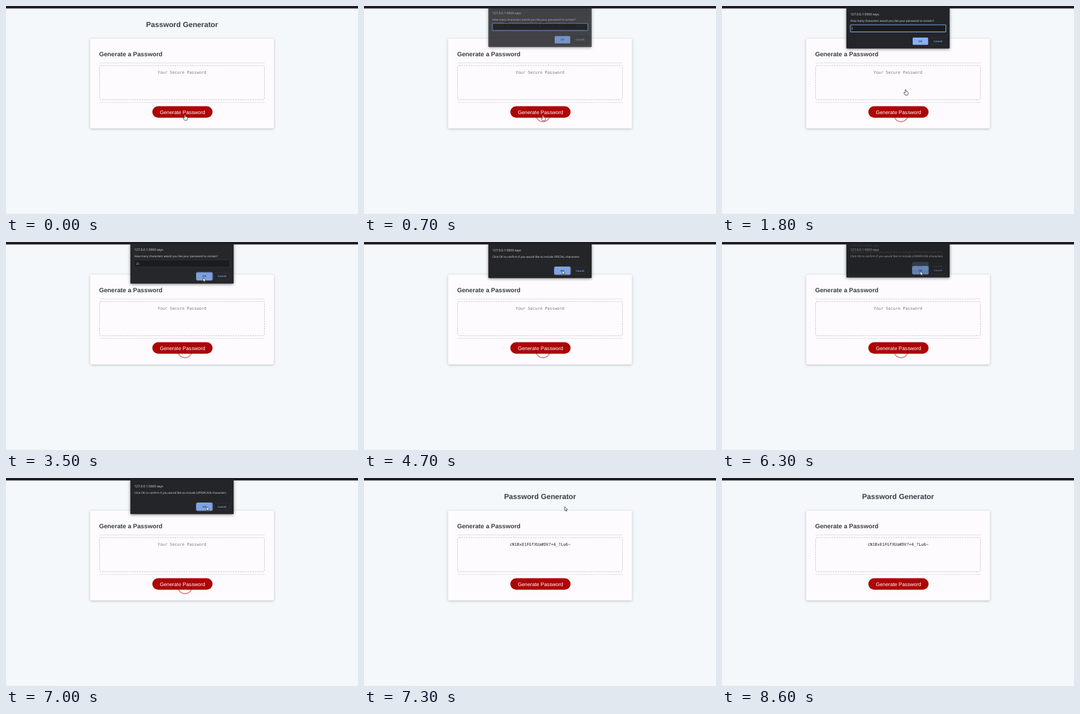
Write an HTML page with a canvas that moves like this. It is 600 px wide and 356 px high and loops after 9200 ms.

```html
<!DOCTYPE html>
<html lang="en">
<head>
<meta charset="utf-8">
<title>Password Generator</title>
<style>
  html, body { margin: 0; width: 100%; height: 100%; overflow: hidden; background: #f4f8fa; }
  canvas { display: block; width: 600px; height: 356px; }
</style>
</head>
<body>
<canvas id="stage" width="600" height="356"></canvas>
<script>
const ctx = document.getElementById('stage').getContext('2d');
const LOOP = 9200, STEP = 100, FADE = 200;
const ARIAL = '"Liberation Sans", Arial, sans-serif';
const UI = '"Open Sans", "Noto Sans", sans-serif';
const MONO = '"DejaVu Sans Mono", monospace';

const include = kind => `Click OK to confirm if you would like to include ${kind} characters`;
const dialogs = [
  { open: 600, close: 3470, prompt: true, text: 'How many characters would you like your password to contain?' },
  { open: 3560, close: 4780, text: include('SPECIAL') },
  { open: 4800, close: 5440, text: include('NUMERIC') },
  { open: 5440, close: 6280, text: include('LOWERCASE') },
  { open: 6280, close: 7080, text: include('UPPERCASE') }
];

// Pointer tip: time, x, y
const pointerPath = [
  [0, 305, 186], [1100, 305, 187], [1700, 313, 143], [2500, 313, 143],
  [3000, 336, 61], [3600, 336, 61], [4000, 338, 48.5], [5000, 338, 48.5],
  [5400, 337, 51], [6300, 338, 50], [6700, 342, 49], [7400, 342, 49],
  [7800, 270, 176], [7900, 270, 176], [8600, -12, 346]
];

const hand = new Path2D('M-.9 .8Q0-.6.9 .8V3.4L3.6 4.1Q4.6 4.5 4.4 6L3.7 9.5H-.8L-3.2 6Q-3 4.7-1.8 5.4L-.9 6Z');
const arrow = new Path2D('M0 0V7L1.6 5.5 2.7 8 3.8 7.5 2.8 5.1H5Z');
const beam = new Path2D('M-1.5-4H1.5M0-4V4M-1.5 4H1.5');

const clamp = v => Math.max(0, Math.min(1, v));
const smooth = v => v * v * (3 - 2 * v);

function box(x, y, w, h, r, fill, stroke, width = 1) {
  ctx.beginPath();
  ctx.roundRect(x, y, w, h, r);
  if (fill) { ctx.fillStyle = fill; ctx.fill(); }
  if (stroke) { ctx.strokeStyle = stroke; ctx.lineWidth = width; ctx.stroke(); }
}

function write(text, x, y, font, color, align = 'left') {
  ctx.font = font;
  ctx.fillStyle = color;
  ctx.textAlign = align;
  ctx.fillText(text, x, y);
}

function shadow(color, blur, y) {
  ctx.shadowColor = color;
  ctx.shadowBlur = blur;
  ctx.shadowOffsetY = y;
}

function drawPage(t) {
  ctx.fillStyle = '#f4f8fa';
  ctx.fillRect(0, 0, 600, 356);
  ctx.fillStyle = '#211c24';
  ctx.fillRect(0, 0, 600, 4);
  ctx.fillStyle = 'rgba(33,28,36,.35)';
  ctx.fillRect(0, 4, 600, .7);
  ctx.fillStyle = '#eeefed';
  ctx.fillRect(0, 355, 80, 1);

  write('Password Generator', 300, 36, `bold 12.55px ${ARIAL}`, '#3a3f48', 'center');

  ctx.save();
  shadow('rgba(0,0,0,.24)', 4, 1);
  box(143.3, 56, 313.5, 153.5, 2, '#fdfbfd');
  ctx.restore();
  write('Generate a Password', 158.7, 85.5, `bold 10.63px ${ARIAL}`, '#3a3f48');
  ctx.fillStyle = '#dfdfe3';
  ctx.fillRect(159, 97, 282, 1);
  ctx.fillRect(159, 164.5, 282, 1);

  ctx.setLineDash([2.6, 1.6]);
  box(159.5, 102, 281, 58.3, 2, null, '#bfbfc2', .9);
  ctx.setLineDash([]);
  const done = t >= 7200;
  write(done ? 'cN1BxE1FGfXUa#DV?+4_?Lu6~' : 'Your Secure Password', 300, 115.7,
    `6.9px ${MONO}`, done ? '#202024' : '#7b7b7f', 'center');

  box(249.4, 171.6, 102.7, 19.6, 9.8, '#ad0506');
  write('Generate Password', 300.8, 184.5, `8.75px ${ARIAL}`, '#fff', 'center');
}

function drawRipple(t) {
  if (t < 400 || t >= 7300) return;
  ctx.save();
  ctx.globalCompositeOperation = 'multiply';
  ctx.globalAlpha = 1 - clamp((t - 7100) / 200);
  ctx.beginPath();
  ctx.arc(305, 186, 3 + 9 * clamp((t - 400) / 300), 0, Math.PI * 2);
  ctx.strokeStyle = '#ee6a6a';
  ctx.lineWidth = 1.4;
  ctx.stroke();
  ctx.restore();
}

function drawField(t) {
  const focused = t < 3300;
  box(218.8, 32.2, 162.8, 12.2, 1.2, '#1b1c1f', focused ? '#7fa6e6' : '#3b3c40', focused ? 1.1 : .7);
  const typed = '25'.slice(0, t < 2300 ? 0 : t < 2500 ? 1 : 2);
  write(typed, 221.5, 40, `4.8px ${UI}`, '#d8d9dc');
  if (focused && Math.floor((t - 800) / 500) % 2 === 0) {
    ctx.fillStyle = '#e0e0e3';
    ctx.fillRect(221.6 + typed.length * 2.75, 35.3, .6, 5.8);
  }
}

function drawDialog(d, t) {
  if (t < d.open || t >= d.close + FADE) return;
  const enter = clamp((t - d.open) / FADE);
  const leave = clamp((t - d.close) / FADE);
  const away = (1 - enter) ** 2;
  const height = d.prompt ? 69.5 : 58.5;
  const top = d.prompt ? 54 : 43;
  const hovered = d.prompt ? t >= 3000 : t >= d.open + 300;

  ctx.save();
  ctx.beginPath();
  ctx.rect(0, 3, 600, 353);
  ctx.clip();
  ctx.globalAlpha = (1 - away) * (1 - leave * leave);
  ctx.translate(0, -10 * (away + leave));

  ctx.save();
  shadow('rgba(0,0,0,.5)', 5, 1);
  box(212, 3.3, 176, height, 1.5, '#242529');
  ctx.restore();

  write('127.0.0.1:5500 says', 218.7, 16, `5.45px ${UI}`, '#e4e5e8');
  write(d.text, 218.7, 27, `4.83px ${UI}`, '#dedfe2');
  if (d.prompt) drawField(t);

  if (!d.prompt || t >= 3300) box(324.4, top - .5, 27.6, 13.4, 1.8, null, '#a9c5f5', .8);
  box(325, top, 26.4, 12.4, 1.5, hovered ? '#7da4e6' : '#89b0f3');
  write('OK', 338.2, top + 7.9, `600 4.5px ${UI}`, '#26354f', 'center');
  box(355, top + .3, 26.6, 11.8, 1.5, null, '#34363b', .7);
  write('Cancel', 368.2, top + 7.9, `600 4.5px ${UI}`, '#85abed', 'center');
  ctx.restore();
}

function pointerAt(t) {
  const next = pointerPath.findIndex(p => p[0] > t);
  if (next < 0) return null;
  const [t0, x0, y0] = pointerPath[next - 1];
  const [t1, x1, y1] = pointerPath[next];
  const k = smooth((t - t0) / (t1 - t0));
  return [x0 + (x1 - x0) * k, y0 + (y1 - y0) * k];
}

function drawPointer(t) {
  const at = pointerAt(t);
  if (!at) return;
  const [x, y] = at;
  const inText = t > 7300 && x > 159 && x < 441 && y > 102 && y < 160;
  const onButton = x > 250 && x < 352 && y > 172 && y < 191;
  ctx.save();
  ctx.translate(x, y);
  ctx.lineJoin = 'round';
  ctx.lineWidth = .8;
  ctx.strokeStyle = '#33343a';
  if (inText) {
    ctx.stroke(beam);
  } else {
    const shape = t < 2700 || onButton ? hand : arrow;
    ctx.fillStyle = '#fff';
    ctx.fill(shape);
    ctx.stroke(shape);
  }
  ctx.restore();
}

function draw(now) {
  const t = Math.floor((now % LOOP) / STEP) * STEP;
  drawPage(t);
  drawRipple(t);
  dialogs.forEach(d => drawDialog(d, t));
  drawPointer(t);
}

let start;
function tick(now) {
  start ??= now;
  draw(now - start);
  requestAnimationFrame(tick);
}
ctx.textRendering = 'geometricPrecision';
draw(0);
requestAnimationFrame(tick);
</script>
</body>
</html>
```
